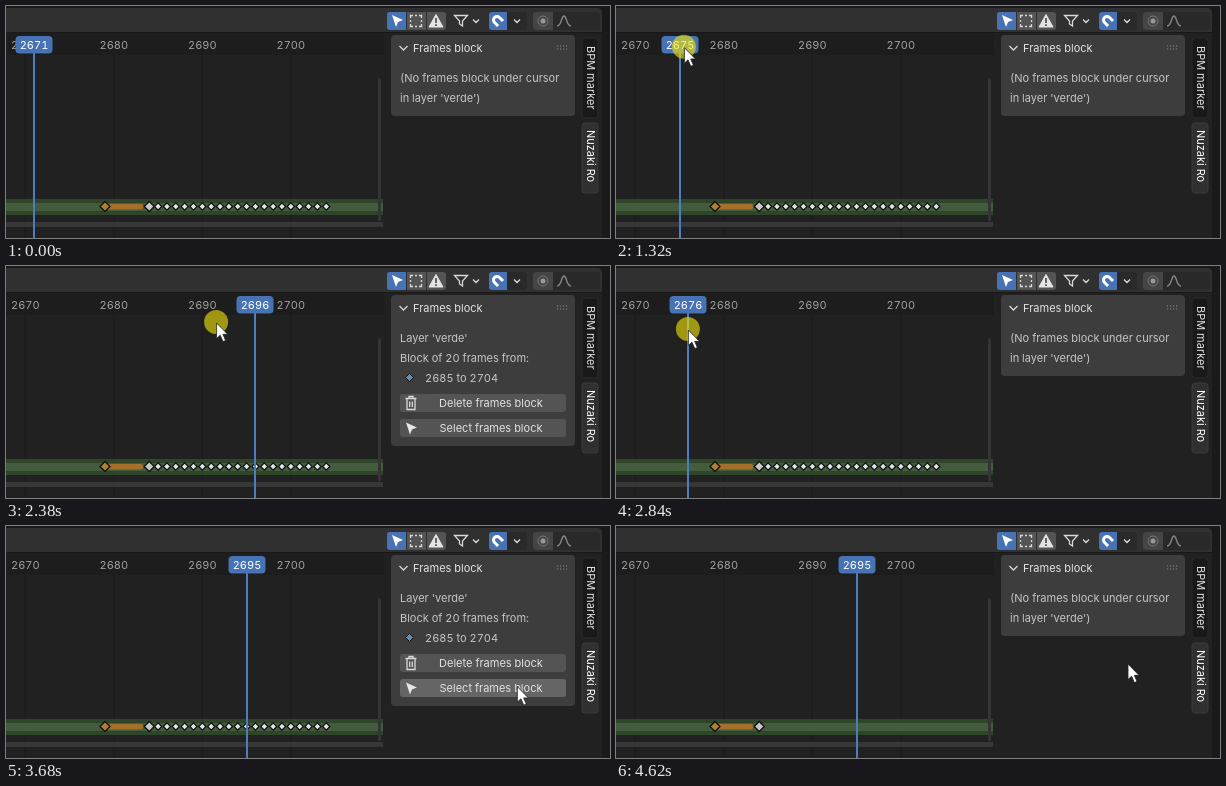
Write an HTML page that moves like this. It is 604 px wide and 232 px high and loops after 5.09 s.

```html
<!DOCTYPE html>
<html lang="en">
<head>
<meta charset="utf-8">
<title>Frames block</title>
<style>
  html, body { margin: 0; width: 100%; height: 100%; overflow: hidden; background: #212121; }
  svg { display: block; }
  text { font: 11px Inter, "Open Sans", sans-serif; font-variant-numeric: tabular-nums; fill: #e2e2e2; white-space: pre; }
  .mid { text-anchor: middle; }
  .ruler text { fill: #a0a0a0; }
  .line { fill: none; stroke: #d8d8d8; stroke-width: 1.3; }
  .soft { fill: #c6c6c6; }
  .bright { fill: #fff; }
  .button { fill: #545454; }
  .button.hover { fill: #656565; }
  .button.pressed { fill: #4772b3; }
</style>
</head>
<body>
<svg width="604" height="232" viewBox="0 0 604 232">
  <rect width="604" height="232" fill="#212121"/>
  <rect y="27" width="378" height="22" fill="#1d1d1d"/>
  <g id="grid" class="ruler"></g>

  <!-- header -->
  <rect width="604" height="27" fill="#191919"/>
  <path d="M0 2H591Q596 2 596 7V26H0Z" fill="#303030"/>
  <path d="M596 26H604V232H596Z" fill="#1a1a1a"/>
  <rect x="381" y="6" width="59" height="18" rx="3" fill="#545454"/>
  <path d="M384 6H400V24H384Q381 24 381 21V9Q381 6 384 6Z" fill="#4772b3"/>
  <path d="M400.5 6V24M420.5 6V24" stroke="#303030"/>
  <path d="M386 9L397 14L392 16L390 21Z" fill="#fff"/>
  <path d="M404.5 12V9.500H407M413 9.500H415.500V12M415.500 18V20.500H413M407 20.500H404.500V18M409 9.500H411M409 20.500H411M404.500 14V16M415.500 14V16" class="line" stroke-width="1"/>
  <path d="M430 8.500L437 21H423Z" fill="#e4e4e4" stroke="#e4e4e4" stroke-linejoin="round"/>
  <path d="M430 12V17M430 18.300V20" stroke="#444" stroke-width="1.600"/>
  <path d="M448.500 9.500H461.500L456.500 15V20L453.500 18V15Z" class="line"/>
  <rect x="483" y="6" width="38" height="18" rx="3" fill="#292929"/>
  <path d="M486 6H501V24H486Q483 24 483 21V9Q483 6 486 6Z" fill="#4772b3"/>
  <path d="M-3.500 -5V0A3.500 3.500 0 0 0 3.500 0V-5" fill="none" stroke="#fff" stroke-width="3" transform="translate(491 14) rotate(135)"/>
  <rect x="527" y="6" width="67" height="18" rx="3" fill="#292929"/>
  <path d="M530 6H547V24H530Q527 24 527 21V9Q527 6 530 6Z" fill="#454545"/>
  <circle cx="537" cy="15" r="5" fill="none" stroke="#777"/>
  <circle cx="537" cy="15" r="2.500" fill="#999"/>
  <path d="M551 20C556 20 555 10 558 10S560 20 565 20" fill="none" stroke="#888" stroke-width="1.300"/>
  <path d="M467 13.500L470 16.500L473 13.500M508 13.500L511 16.500L514 13.500" class="line"/>

  <!-- channel -->
  <rect y="193" width="377" height="16" fill="#2e4529"/>
  <rect y="197" width="377" height="8" fill="#435c3e"/>
  <rect x="99" y="198" width="38" height="5.500" rx="2" fill="#a4702a"/>
  <g id="keys" stroke="#111" stroke-width="1.300"></g>
  <g id="block" stroke="#111" stroke-width="1.300"></g>
  <rect x="372" y="72" width="3" height="143" rx="1.500" fill="#343434"/>
  <rect y="216" width="377" height="5" fill="#373737"/>

  <!-- sidebar -->
  <rect x="576" y="32" width="16" height="80" rx="3" fill="#191919" stroke="#2b2b2b"/>
  <rect x="576" y="117" width="16" height="70" rx="3" fill="#303030" stroke="#3a3a3a"/>
  <text transform="translate(581 40) rotate(90)">BPM marker</text>
  <text class="bright" transform="translate(581 124) rotate(90)">Nuzaki Ro</text>
  <rect id="panel" x="385" y="29" width="184" rx="4" fill="#3d3d3d"/>
  <path d="M393.500 40L397.500 44L401.500 40" class="line"/>
  <text x="407" y="46">Frames block</text>
  <path d="M551 40H563M551 43H563" stroke="#888" stroke-width="1.200" stroke-dasharray="1.200 1.800"/>
  <g id="empty">
    <text class="soft" x="394" y="76">(No frames block under cursor</text>
    <text class="soft" x="394" y="96">in layer 'verde')</text>
  </g>
  <g id="details">
    <text class="soft" x="394" y="76">Layer 'verde'</text>
    <text class="soft" x="394" y="96">Block of 20 frames from:</text>
    <path d="M403.500 107.500L407.500 111.500L403.500 115.500L399.500 111.500Z" fill="#5a90be" stroke="#151515"/>
    <text class="soft" x="419" y="116">2685 to 2704</text>
    <rect id="deleteButton" class="button" x="394" y="128" width="166" height="18" rx="3"/>
    <path d="M399.500 132.500H410.500M403 132V130.500H407V132M401 133V143.500H409V133M403.700 135.500V141M406.300 135.500V141" class="line" stroke-width="1"/>
    <text class="mid" x="485" y="141">Delete frames block</text>
    <rect id="selectButton" class="button" x="394" y="153" width="166" height="18" rx="3"/>
    <path d="M400 156.500L411 161.500L406 163.500L404 168.500Z" fill="#e6e6e6"/>
    <text class="mid" x="485" y="166">Select frames block</text>
  </g>

  <g id="playhead">
    <path d="M0 40V232" stroke="#4d7cc0" stroke-width="2"/>
    <rect x="-18.500" y="30" width="37" height="17.500" rx="4" fill="#4772b3"/>
    <text id="frameLabel" class="mid bright" y="43"></text>
  </g>
  <g id="pointer">
    <circle id="press" cx="-.500" cy="-1" r="12" fill="#f7e706" fill-opacity=".6"/>
    <path d="M0 0V15.500L3.600 12.200L6.400 18.600L9 17.500L6.300 11.300H11Z" fill="#fff" stroke="#222" stroke-width=".8"/>
  </g>
</svg>
<script>
const LOOP = 5090;
const FRAME_WIDTH = 8.85;
const FIRST_KEY = 2685, LAST_KEY = 2704;
const DRAG = { start: 630, end: 3300 };
const CLICK = { start: 4150, release: 4340, end: 4500 };
const SCRUB_LAG = 40;

// The screen refreshes in steps, restarted by each spell of activity
const REFRESH = 66;
const spells = [0, 70, 630, 1170, 1720, 2380, 2960, 3540, 4150];

const smooth = u => u * u * (3 - 2 * u);
const easeOut = u => 1 - (1 - u) ** 3;

const ENTRY = { x: 278, y: 213 };
const stroke = (start, end, x, y, ease = smooth) => ({ start, end, x, y, ease });
const strokes = [
  stroke(70, 560, 26, 42),
  stroke(630, 840, 16, 37),
  stroke(840, 1120, 40, 39),
  stroke(1120, 1350, 72, 42),
  stroke(1350, 1865, 262, 54),
  stroke(1865, 2010, 250, 55),
  stroke(2340, 2840, 72, 64, easeOut),
  stroke(2920, 3280, 241, 53),
  stroke(3330, 3480, 369, 75),
  stroke(3480, 3680, 512, 161),
  stroke(3690, 3780, 515, 197),
  stroke(3780, 3940, 512, 138)
];

const $ = id => document.getElementById(id);
const show = (id, on) => $(id).setAttribute("display", on ? "inline" : "none");
const move = (id, x, y) => $(id).setAttribute("transform", `translate(${x} ${y})`);
const clamp = (value, low, high) => Math.min(high, Math.max(low, value));
const frameX = frame => 28.2 + (frame - 2671) * FRAME_WIDTH;
const frameAt = x => Math.round(2671 + (x - 28.2) / FRAME_WIDTH);

function pointerAt(t) {
  return strokes.reduce((from, s) => {
    const k = s.ease(clamp((t - s.start) / (s.end - s.start), 0, 1));
    return { x: from.x + (s.x - from.x) * k, y: from.y + (s.y - from.y) * k };
  }, ENTRY);
}

function lastRefresh(t) {
  const start = spells.filter(spell => spell <= t).pop();
  return start + Math.floor((t - start) / REFRESH) * REFRESH;
}

function diamond(frame, r, fill) {
  return `<path d="M${frameX(frame)} ${200.5 - r}l${r} ${r}l${-r} ${r}l${-r} ${-r}z" fill="${fill}"/>`;
}

function build() {
  for (let frame = 2670; frame <= 2700; frame += 10) {
    const x = frameX(frame);
    $("grid").innerHTML += `<path d="M${x} 49V232" stroke="#1c1c1c"/>` +
      `<text class="mid" x="${x}" y="43">${frame}</text>`;
  }
  $("keys").innerHTML = diamond(2679, 5, "#b07f30") + diamond(2684, 5, "#c8c8c8");
  for (let frame = FIRST_KEY; frame <= LAST_KEY; frame++) {
    $("block").innerHTML += diamond(frame, 3.6, "#e0e6e6");
  }
}

function render(time) {
  const t = lastRefresh(time);
  const { x, y } = pointerAt(t);
  const scrubTime = clamp(t - SCRUB_LAG, DRAG.start, DRAG.end);
  const frame = frameAt(pointerAt(scrubTime).x);
  const deleted = t >= CLICK.release;
  const inBlock = !deleted && frame >= FIRST_KEY && frame <= LAST_KEY;
  const during = span => t >= span.start && t < span.end;

  move("playhead", Math.round(frameX(frame)), 0);
  $("frameLabel").textContent = frame;
  move("pointer", x, y);
  show("pointer", t >= strokes[0].start);
  show("press", during(DRAG) || during(CLICK));

  show("block", !deleted);
  show("details", inBlock);
  show("empty", !inBlock);
  $("panel").setAttribute("height", inBlock ? 151 : 81);

  const overButtons = x > 394 && x < 560;
  $("deleteButton").classList.toggle("hover", overButtons && y >= 128 && y < 146);
  $("deleteButton").classList.toggle("pressed", t >= CLICK.start);
  $("selectButton").classList.toggle("hover", overButtons && y >= 153 && y < 171);
}

build();
const began = performance.now();
function tick() {
  render((performance.now() - began) % LOOP);
  requestAnimationFrame(tick);
}
tick();
</script>
</body>
</html>
```
